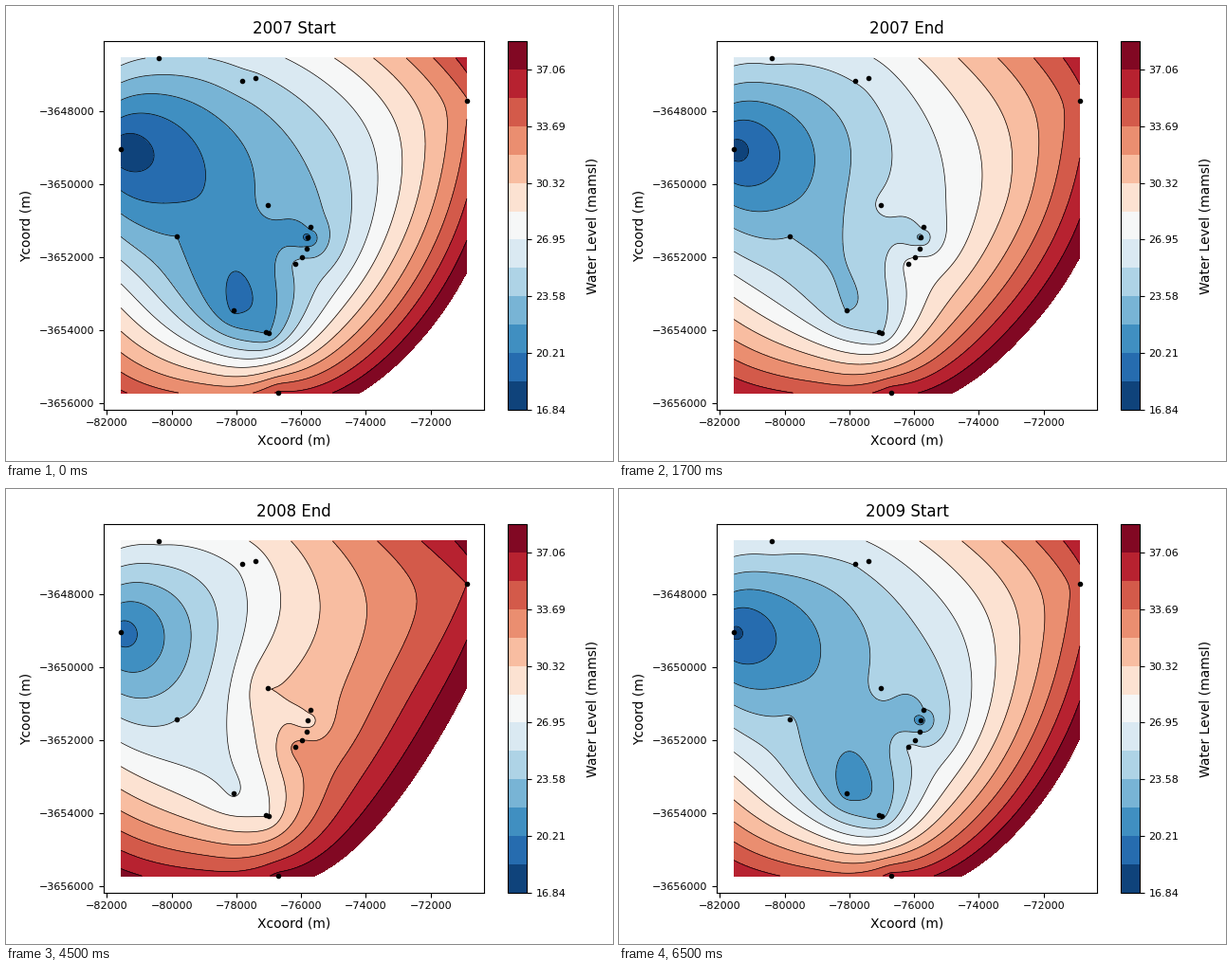
A matplotlib script for the animation above (8000 ms loop, 640 by 480 pixels).

```python
import numpy as np
import matplotlib.pyplot as plt
from matplotlib.animation import FuncAnimation

WEST, EAST, SOUTH, NORTH = -81570, -70880, -3655720, -3646540
BASE, STEP = 16.84, 1.685
LEVELS = BASE + STEP * np.arange(14)

# Positions are on a local map sheet: x grows east, y grows south.
SHEET_ORIGIN = np.array([121, 55])
KM_PER_UNIT = np.array([(EAST - WEST) / 365e3, (NORTH - SOUTH) / 353e3])

WELLS = [(121, 151), (486, 100), (287, 408), (240, 321), (277, 345),
         (321, 233), (318, 244), (317, 256), (312, 265), (305, 272),
         (161, 55), (249, 79), (263, 76), (276, 210), (180, 243), (274, 344)]
# Unmarked points that steer the regional trend.
ANCHORS = [(121, 300), (121, 408), (486, 55), (430, 360),
           (412, 200), (370, 55), (210, 390)]

# Water level at the wells, then at the anchors, in contour steps above BASE.
SURVEYS = {
    "2007 Start": ([0.25, 9.9, 11.2, 1.8, 2.95, 3.5, 1.4, 3.4,
                    3.95, 4.2, 4.93, 4.6, 4.8, 3.35, 3.0, 2.9],
                   [6.3, 11.15, 11.6, 13.0, 6.9, 7.55, 8.3]),
    "2007 End": ([0.5, 10.6, 11.7, 3.95, 4.95, 5.4, 3.5, 5.6,
                  6.0, 6.3, 5.35, 5.05, 5.3, 5.2, 4.0, 4.88],
                 [6.7, 11.9, 11.7, 13.75, 8.05, 8.3, 9.5]),
    "2008 Start": ([0.4, 9.97, 11.2, 2.6, 2.95, 3.9, 2.0, 3.6,
                    4.0, 4.3, 5.1, 5.0, 5.0, 4.15, 3.65, 2.9],
                   [6.45, 11.8, 11.5, 13.15, 7.35, 7.85, 8.6]),
    "2008 End": ([1.4, 11, 12.3, 5.85, 7.0, 8.5, 6.95, 8.6,
                  9.0, 9.3, 6.2, 6.2, 6.6, 8.0, 5.0, 6.93],
                 [7.3, 12.4, 12.5, 14.7, 10.3, 9.55, 10.25]),
    "2009 Start": ([0.7, 10.4, 11.4, 2.6, 3.65, 4.0, 2.3, 4.0,
                    4.8, 5.1, 5.8, 5.05, 5.4, 4.35, 4.15, 3.58],
                   [6.9, 11.9, 11.75, 13.5, 7.7, 8.2, 9.1]),
}
TITLES = list(SURVEYS)


def to_km(points):
    return (np.asarray(points, float) - SHEET_ORIGIN) * KM_PER_UNIT


def to_map(km):
    return WEST + 1000 * km[..., 0], NORTH - 1000 * km[..., 1]


def distance(a, b):
    return np.hypot(*(a[:, None] - b[None]).transpose(2, 0, 1))


WELLS_KM = to_km(WELLS)
KNOWN = to_km(WELLS + ANCHORS)


def covariance(a, b):
    """A cone at every well plus a weak thin-plate surface."""
    d = distance(a, b)
    cones = distance(a, WELLS_KM) @ distance(b, WELLS_KM).T
    return 30 * cones + 0.01 * d**2 * np.log(d + 1e-9)


def trend(points):
    return np.column_stack([np.ones(len(points)), points])


def krige(readings, targets):
    n, drift = len(KNOWN), trend(KNOWN)
    system = np.zeros((n + 3, n + 3))
    system[:n, :n] = covariance(KNOWN, KNOWN) + 0.002 * np.eye(n)
    system[:n, n:], system[n:, :n] = drift, drift.T
    weights = np.linalg.solve(system, np.r_[readings, 0, 0, 0])
    return BASE + STEP * np.hstack([covariance(targets, KNOWN), trend(targets)]) @ weights


fig, ax = plt.subplots(figsize=(6.4, 4.8), dpi=100)

grid = np.stack(np.meshgrid(np.linspace(0, (EAST - WEST) / 1000, 200),
                            np.linspace(0, (NORTH - SOUTH) / 1000, 200)), axis=-1)
grid_x, grid_y = to_map(grid)

layers = []
for at_wells, at_anchors in SURVEYS.values():
    level = krige(at_wells + at_anchors, grid.reshape(-1, 2)).reshape(grid_x.shape)
    fill = ax.contourf(grid_x, grid_y, level, LEVELS, cmap="RdBu_r")
    edges = ax.contour(grid_x, grid_y, level, LEVELS[:-1], colors="k", linewidths=0.5)
    layers.append((fill, edges))

ax.plot(*to_map(WELLS_KM), "k.", markersize=6, zorder=3)

pad_x, pad_y = 0.05 * (EAST - WEST), 0.05 * (NORTH - SOUTH)
ax.set(xlim=(WEST - pad_x, EAST + pad_x), ylim=(SOUTH - pad_y, NORTH + pad_y),
       xticks=range(-82000, -71000, 2000), yticks=range(-3656000, -3647000, 2000))
ax.ticklabel_format(style="plain", useOffset=False)
ax.tick_params(labelsize=8)
ax.set_xlabel("Xcoord (m)", fontsize=10)
ax.set_ylabel("Ycoord (m)", fontsize=10)
title = ax.set_title(TITLES[0], fontsize=12)

bar = fig.colorbar(layers[0][0], ax=ax, ticks=LEVELS[::2], format="%.2f")
bar.ax.tick_params(labelsize=8)
bar.set_label("Water Level (mamsl)", fontsize=10, labelpad=15)
fig.tight_layout()


def update(frame):
    current = (frame + 3) // 4
    for index, layer in enumerate(layers):
        for artist in layer:
            artist.set_visible(index == current)
    title.set_text(TITLES[current])


anim = FuncAnimation(fig, update, frames=16, interval=500, repeat=True,
                     init_func=lambda: update(0))
plt.show()
```
